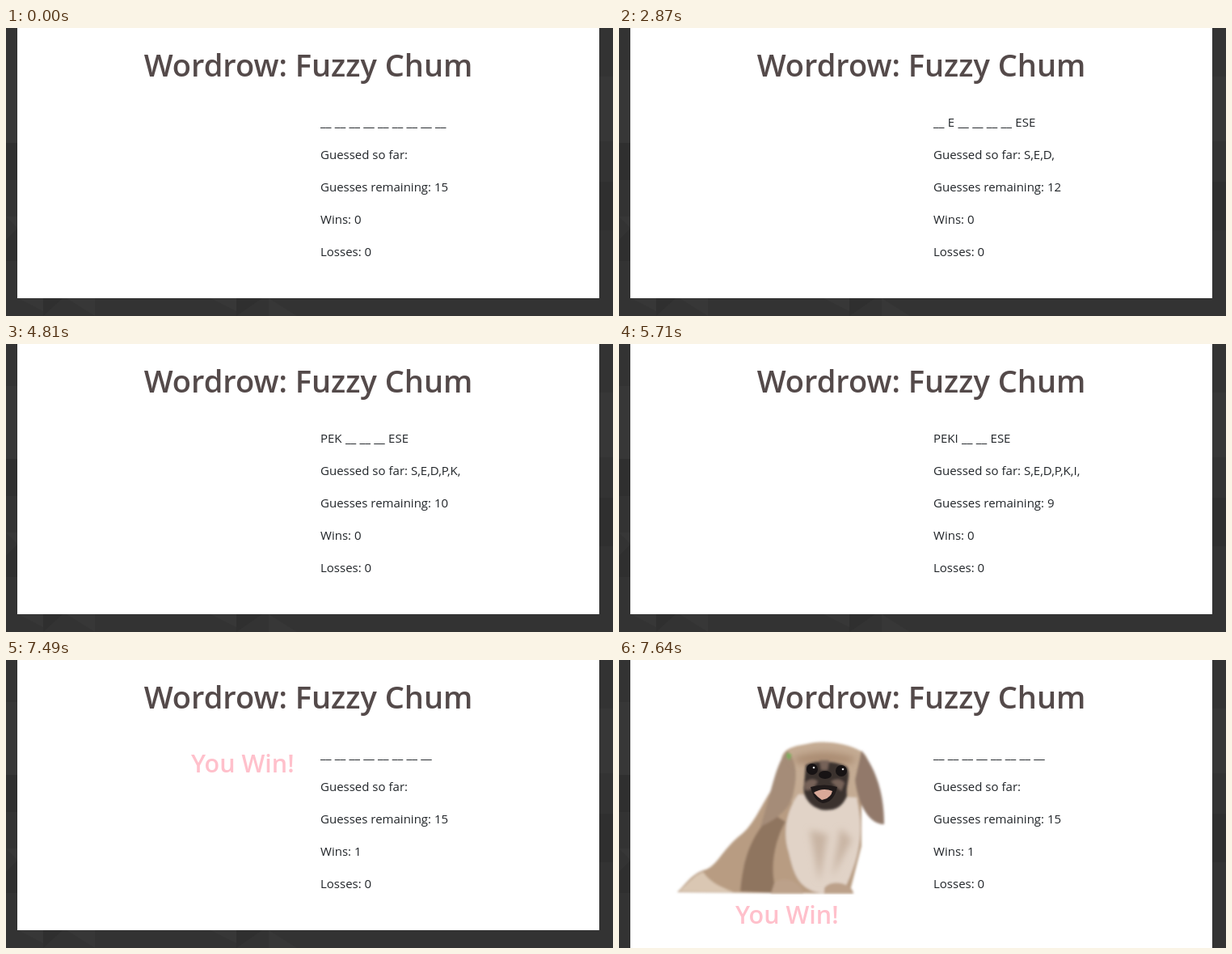
Write an HTML page that moves like this. It is 751 px wide and 356 px high and loops after 9.7 s.

```html
<!DOCTYPE html>
<html lang="en">
<head>
<meta charset="utf-8">
<style>
  html, body { margin: 0; height: 100%; overflow: hidden; background: #333; }
  svg { display: block; font: 15px "Open Sans", "Noto Sans", sans-serif; fill: #212529; }
  .title { font-size: 38px; font-weight: 600; fill: #544a4a; text-anchor: middle; }
  .win { font-size: 30.5px; font-weight: 600; fill: #ffc0cb; }
  #word { word-spacing: .4px; }
</style>
</head>
<body>
<svg width="751" height="356" viewBox="0 0 751 356">
  <defs>
    <filter id="soft" x="-10%" y="-10%" width="120%" height="120%"><feGaussianBlur stdDeviation="1.6"/></filter>
    <filter id="softer" x="-30%" y="-30%" width="160%" height="160%"><feGaussianBlur stdDeviation="4"/></filter>
    <clipPath id="loaded"><rect id="reveal" x="60" y="90" width="290" height="200"/></clipPath>
  </defs>

  <rect width="751" height="356" fill="#333"/>
  <path fill="#373737" d="M0 52h14v90H0zM0 233l14 14v-14zM15 334h31v16zM75 334l35 22v-22zM253 334h32v16zM325 334l35 22H325zM734 60h17v80h-17z"/>
  <path fill="#2f2f2f" d="M0 142h14v46H0zM0 262l14-14v40H0zM46 334v22l24-22zM285 334v22l32-22zM734 190h17v60h-17z"/>
  <rect id="page" x="14" width="720" height="334" fill="#fff"/>

  <text class="title" x="374" y="60">Wordrow: Fuzzy Chum</text>
  <text id="word" x="389" y="122"></text>
  <text id="guessed" x="389" y="162"></text>
  <text id="remaining" x="389" y="202"></text>
  <text id="wins" x="389" y="242"></text>
  <text x="389" y="282">Losses: 0</text>

  <g id="dog" clip-path="url(#loaded)">
    <g filter="url(#soft)">
      <path fill="#b89c82" d="M204 140C178 170 172 198 152 215C126 235 122 256 104 260C88 266 80 280 72 287L285 289L300 230L300 150Z"/>
      <path fill="#8f755f" d="M190 190C166 214 154 240 150 286L196 288C184 260 194 220 206 200Z"/>
      <path fill="#dac7b3" d="M104 262C92 266 82 280 74 286L142 287C124 280 112 274 104 262Z"/>
      <path fill="#c4ab93" d="M201 122C204 106 224 106 236 103C258 99 284 104 298 112C312 118 310 138 308 162L280 188H226L202 164Z"/>
      <path fill="#a58c78" d="M208 112C194 128 190 158 175 206C192 198 212 186 216 164C221 142 220 124 208 112Z"/>
      <path fill="#92796a" d="M300 112C314 130 328 158 328 203C310 204 295 178 292 148Z"/>
      <path fill="#e1d3c7" d="M222 166C207 186 202 214 210 238C216 264 222 284 250 288L278 286C292 254 306 222 294 170Z"/>
      <path fill="#bca18a" d="M192 276C200 266 226 272 228 289H188ZM254 282C262 270 290 276 290 289H254Z"/>
      <path fill="#7cae5c" d="M208 114l6 3l-3 7l-4-4z"/>
    </g>
    <g filter="url(#softer)">
      <path fill="#c8b4a3" d="M236 210L248 274L258 216ZM274 208L264 268L288 222Z"/>
      <path fill="#aa8c72" d="M214 122Q253 106 294 122L286 128H222Z"/>
    </g>
    <g filter="url(#soft)">
      <path fill="#3a302d" d="M231 130C240 124 268 124 282 132C288 144 280 154 282 168C276 184 264 187 250 185C236 181 226 168 229 154Z"/>
      <path fill="#766258" d="M248 124h12l-2 12h-8zM230 152Q238 144 246 150Q238 164 230 160ZM262 150Q272 144 279 152L275 162Z"/>
    </g>
    <g fill="#171314"><circle cx="239" cy="135" r="7"/><circle cx="275" cy="137" r="7"/><ellipse cx="255" cy="142" rx="8" ry="5"/></g>
    <g fill="#ddd"><circle cx="241" cy="133" r="1.3"/><circle cx="277" cy="135" r="1.3"/></g>
    <path fill="#201a1a" d="M237 157Q254 152 270 157Q266 176 252 177Q241 174 237 157Z"/>
    <path fill="#d9a998" d="M241 164Q252 157 264 162Q262 171 251 173Q246 170 241 164Z"/>
  </g>
  <text id="win" class="win">You Win!</text>
</svg>
<script>
  const LOOP = 9700, WON = 7490, LOADING = 7580, LOADED = 7640;
  const ANSWER = [...'PEKINGESE'], NEXT_LENGTH = 8, KEYS = [...'SEDPKIN'];
  const KEY_TIMES = [840, 1690, 2870, 3860, 4810, 5710, 6580];
  const get = id => document.getElementById(id);
  const setText = (id, text) => { get(id).textContent = text; };
  const show = (id, on) => get(id).setAttribute('visibility', on ? 'visible' : 'hidden');
  const place = (id, attrs) => Object.entries(attrs).forEach(([k, v]) => get(id).setAttribute(k, v));
  const blank = ' __ ';

  function render(t) {
    const won = t >= WON, loading = t >= LOADING;
    const guesses = won ? [] : KEYS.filter((_, i) => t >= KEY_TIMES[i]);
    const word = won ? blank.repeat(NEXT_LENGTH)
      : ANSWER.map(c => guesses.includes(c) ? c : blank).join('');
    setText('word', word.trim().replace(/ +/g, ' '));
    setText('guessed', 'Guessed so far: ' + guesses.map(c => c + ',').join(''));
    setText('remaining', 'Guesses remaining: ' + (15 - guesses.length));
    setText('wins', 'Wins: ' + (won ? 1 : 0));
    show('win', won);
    show('dog', loading);
    place('win', loading ? { x: 144, y: 326 } : { x: 229, y: 139 });
    place('page', { height: loading ? 356 : 334 });
    place('reveal', { height: t >= LOADED ? 200 : 32 });
  }

  const start = performance.now();
  function tick() {
    render((performance.now() - start) % LOOP);
    requestAnimationFrame(tick);
  }
  tick();
</script>
</body>
</html>
```
